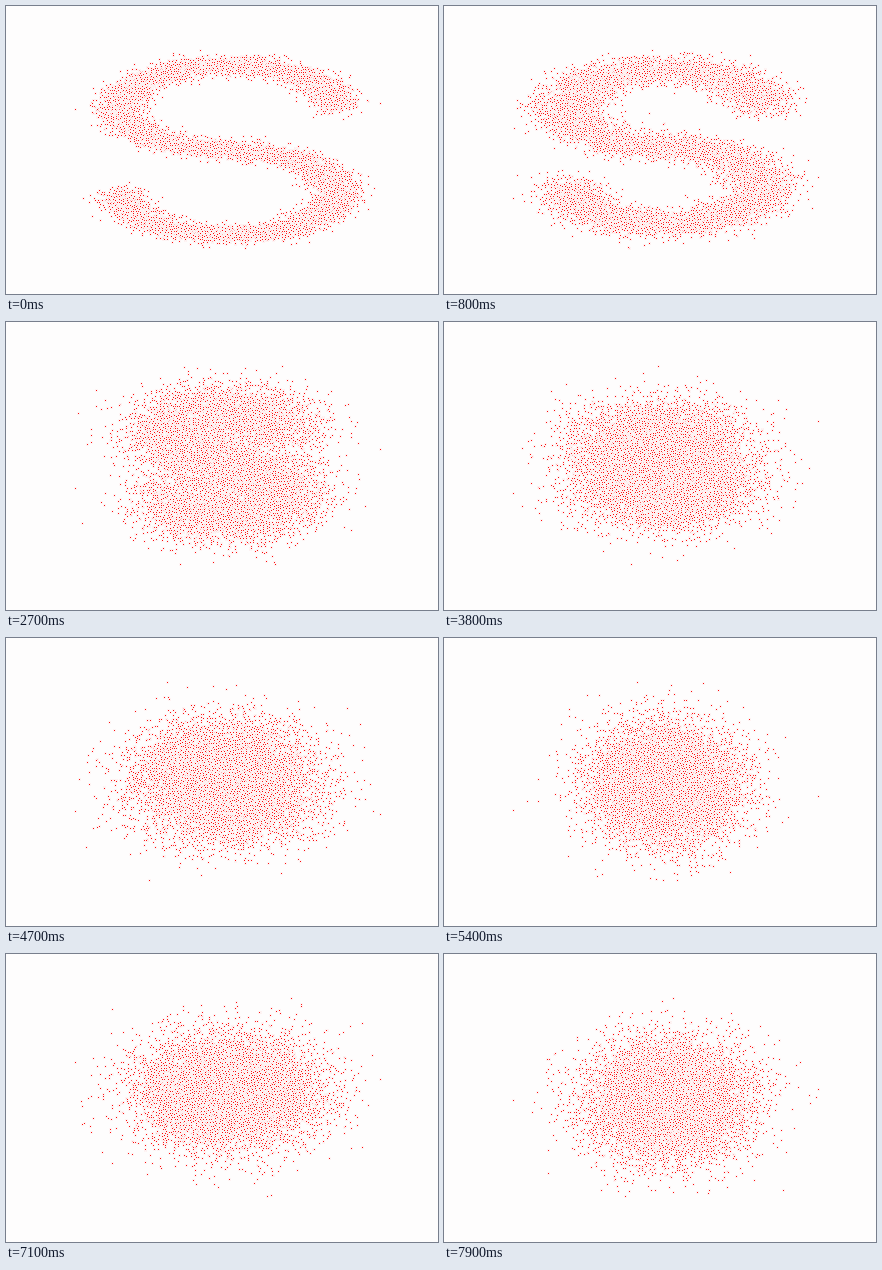
Write a matplotlib script that moves like this. It is 432x288 px and loops after 8 s.

```python
import numpy as np
import matplotlib.pyplot as plt
from matplotlib.animation import FuncAnimation

POINTS, STEPS = 10_000, 100
FRAMES, INTERVAL = 80, 100
PAPER = "#fefdfd"


def gauss(rng):
    """Normal noise without the rarest outliers, which would shrink the view."""
    return np.clip(rng.standard_normal((POINTS, 2)), -4, 4)


def s_curve(rng):
    """Noisy S-shaped cloud in the plane."""
    t = 3 * np.pi * (rng.random(POINTS) - 0.5)
    pts = np.column_stack([np.sin(t), np.sign(t) * (np.cos(t) - 1)])
    return (pts + 0.1 * gauss(rng)) / 10


# Sigmoid noise schedule of the forward diffusion
ramp = 1 / (1 + np.exp(-np.linspace(-6, 6, STEPS)))
betas = ramp * (0.5e-2 - 1e-5) + 1e-5
alpha_bar = np.cumprod(1 - betas)

start = s_curve(np.random.default_rng(7))


def diffuse(step):
    """Cloud after the given number of steps, with fresh noise."""
    noise = gauss(np.random.default_rng(1000 + step))
    keep = alpha_bar[step]
    return np.sqrt(keep) * start + np.sqrt(1 - keep) * noise


fig, ax = plt.subplots(figsize=(6, 4), dpi=72, facecolor=PAPER)
fig.subplots_adjust(left=0.125, right=0.9, bottom=0.125, top=0.88)
ax.axis("off")
# The paper-coloured edge leaves one red pixel of each dot
dots = ax.scatter(start[:, 0], start[:, 1], s=5, color="red",
                  edgecolor=PAPER, linewidth=1)


def draw(frame):
    pts = diffuse(max(0, frame - 1))  # the first picture is held twice as long
    dots.set_offsets(pts)
    low, high = pts.min(axis=0), pts.max(axis=0)
    pad = 0.05 * (high - low)
    (x0, y0), (x1, y1) = low - pad, high + pad
    ax.set_xlim(x0, x1)
    ax.set_ylim(y0, y1)
    return (dots,)


def init():
    return draw(0)


anim = FuncAnimation(fig, draw, frames=FRAMES, init_func=init,
                     interval=INTERVAL, repeat=True, repeat_delay=0, blit=False)
plt.show()
```
